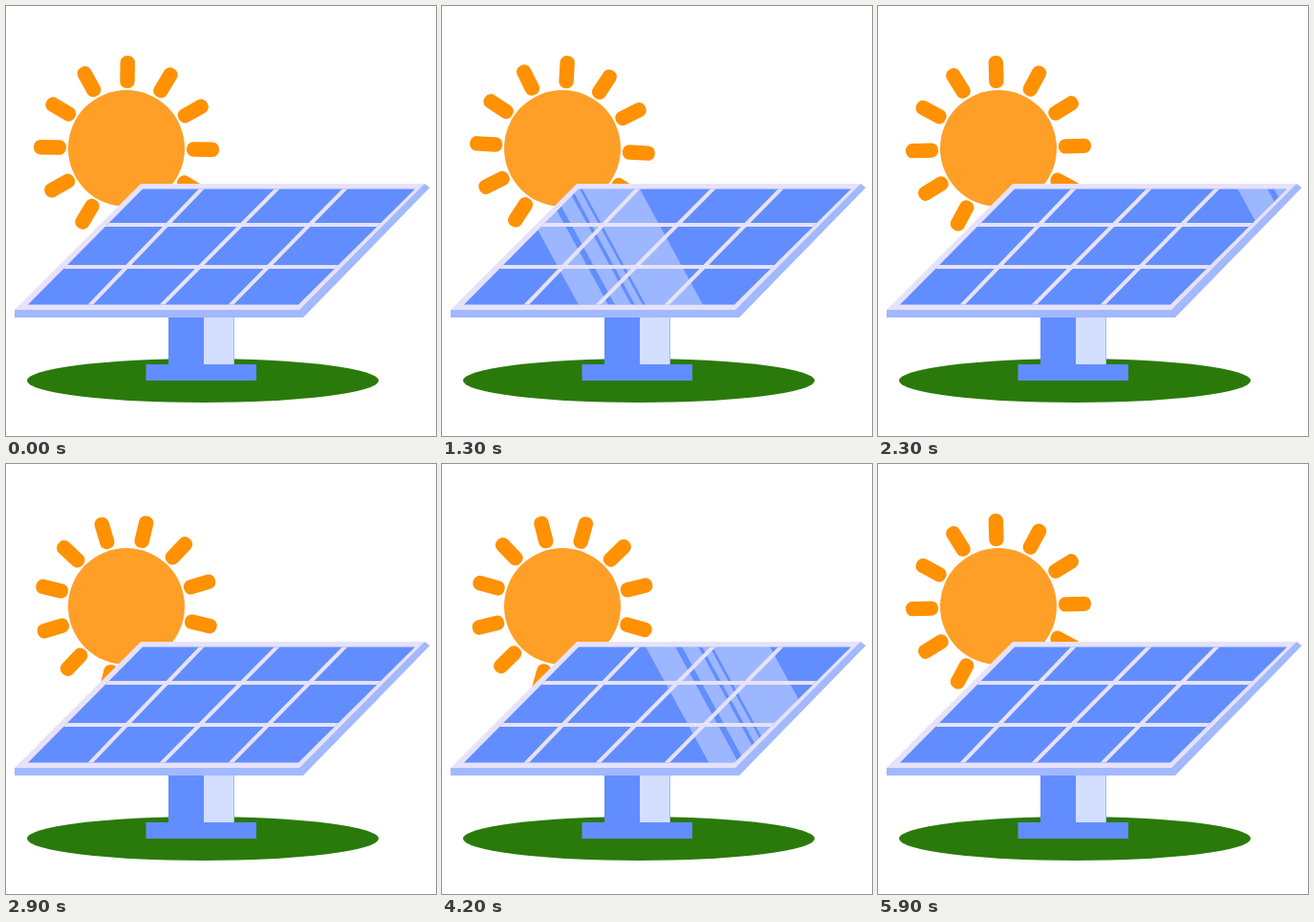
An HTML page for the animation above (6000 ms loop, 450 by 450 pixels).

```html
<!DOCTYPE html>
<html lang="en">
<head>
<meta charset="utf-8">
<title>Solar panel</title>
<style>
  html, body { margin: 0; width: 100%; height: 100%; overflow: hidden; background: #fff; }
  svg { display: block; width: 100vw; height: 100vh; }
</style>
</head>
<body>
<svg viewBox="0 0 450 450">
  <defs>
    <clipPath id="glass"><path d="M143 191.500H428L306 312.500H23Z"/></clipPath>
    <rect id="ray" x="-7.700" y="-97" width="15.400" height="34" rx="7"/>
  </defs>

  <g transform="translate(126 149)">
    <g id="rays" fill="#ff9103"></g>
    <circle r="61" fill="#ff9f27"/>
  </g>

  <ellipse cx="206" cy="392" rx="184" ry="23" fill="#2a7a0b"/>
  <path d="M170 322H207V375H262V392H146.500V375H170Z" fill="#628dff"/>
  <path d="M207 322H238.500V375H207Z" fill="#d3deff"/>
  <path d="M238.500 322V375" stroke="#a3b9ff"/>

  <path d="M9 318L300 300L438 186L443.500 190L311 326H9Z" fill="#a2b8ff"/>
  <path d="M141 186H438L307 318H9Z" fill="#e6e2fa"/>
  <g clip-path="url(#glass)">
    <path d="M0 180H450V320H0Z" fill="#628dff"/>
    <!-- slanted reflection, x measured along the top edge of the glass -->
    <path id="shine" fill="#fff" fill-opacity=".37"/>
    <path d="M0 229H450M0 273H450M206 190L87 314M285 190L162 314M356 190L234 314"
          fill="none" stroke="#e6e2fa" stroke-width="4"/>
  </g>
</svg>
<script>
  const LOOP = 6000, STEP = 100, SLANT = 67;
  const rays = document.getElementById('rays');
  const shine = document.getElementById('shine');

  rays.innerHTML = Array.from({ length: 12 }, (_, i) =>
    `<use href="#ray" transform="rotate(${i * 30})"/>`).join('');

  const bands = [[0, 31], [38, 55], [59, 67], [70, 130]];
  shine.setAttribute('d', bands.map(([a, b]) =>
    `M${a} 191H${b}L${b + SLANT} 314H${a + SLANT}Z`).join(''));

  // Sweeps right, then returns, easing at both ends.
  function shineX(t) {
    const p = t < 2980 ? (t + 40) / 3020 : 1 - (t - 3000) / 2860;
    const phase = Math.min(1, Math.max(0, p));
    return 133 - 320 * Math.cos(Math.PI * phase);
  }

  function draw() {
    const t = Math.floor(performance.now() % LOOP / STEP) * STEP;
    rays.setAttribute('transform', `rotate(${0.8 + t * 0.025})`);
    shine.setAttribute('transform', `translate(${shineX(t)} 0)`);
    requestAnimationFrame(draw);
  }
  draw();
</script>
</body>
</html>
```
